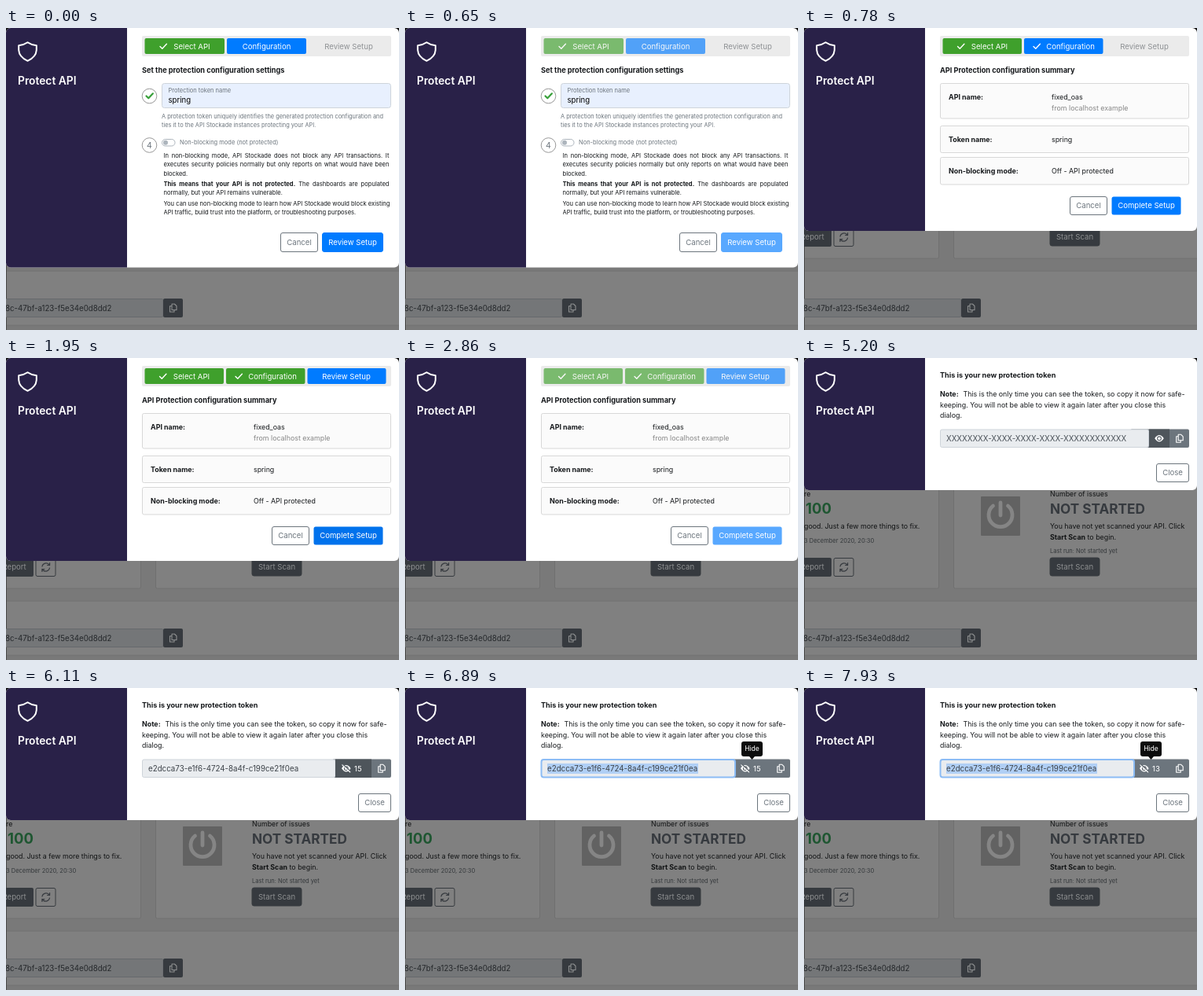
Write an HTML page that moves like this. It is 500x384 px and loops after 8000 ms.

```html
<!DOCTYPE html>
<html lang="en">
<head>
<meta charset="utf-8">
<title>Protect API</title>
<style>
  html, body { margin: 0; width: 100%; height: 100%; overflow: hidden; background: #797979; }
  svg { display: block; width: 500px; height: 384px; }
  svg, .copy { font-family: Inter, Roboto, "Liberation Sans", sans-serif; }
  .copy { font-size: 7.6px; line-height: 11.4px; color: #16191c; white-space: nowrap; }
  .copy p { margin: 0 0 2px; }
  .copy div { height: 11.4px; }
  .copy div:not(:last-child) { text-align-last: justify; }
</style>
</head>
<body>
<svg id="stage" viewBox="0 0 500 384"></svg>
<script>
const INK = '#16191c', GREY = '#6c757d', BLUE = '#007bff', GREEN = '#3fa02c';
const LINE = 'fill="none" stroke-linecap="round" stroke-linejoin="round"';

const text = (x, y, size, str, fill = INK, extra = '') =>
  `<text x="${x}" y="${y}" font-size="${size}" fill="${fill}" ${extra}>${str}</text>`;
const bold = (x, y, size, str, fill = INK) => text(x, y, size, str, fill, 'font-weight="700"');
const mid = (x, y, size, str, fill, extra = '') => text(x, y, size, str, fill, 'text-anchor="middle" ' + extra);
const box = (x, y, w, h, fill, stroke = 'none', r = 2, extra = '') =>
  `<rect x="${x}" y="${y}" width="${w}" height="${h}" rx="${r}" fill="${fill}" stroke="${stroke}" ${extra}/>`;
const line = (d, stroke, width) => `<path d="${d}" ${LINE} stroke="${stroke}" stroke-width="${width}"/>`;
const group = (id, ...parts) => `<g id="${id}">${parts.join('')}</g>`;

const button = (x, y, w, h, label, fill, ink, stroke = fill, extra = '') =>
  box(x + .5, y + .5, w - 1, h - 1, fill, stroke, 2.5, extra) + mid(x + w / 2, y + h / 2 + 3.4, 9.6, label, ink);
const outlined = (x, y, w, h, label) => button(x, y, w, h, label, '#fff', GREY, GREY);
const check = (x, y, color, width = 1.4) => line(`M${x - 4} ${y}l2.8 2.8 5.6-6`, color, width);
const copyIcon = (x, y, color) =>
  line(`M${x - 1.5} ${y - 5}h3.5l2.5 2.5v5h-6zM${x - 2} ${y - 2.5}h-2v7.5h5.5v-2`, color, 1.1);
const eye = (x, y, slashed) =>
  `<path d="M${x - 5.8} ${y}q5.8-8.4 11.6 0q-5.8 8.4-11.6 0z" fill="#fff"/>
   <circle cx="${x}" cy="${y}" r="2.4" fill="#fff" stroke="#596168" stroke-width="1.1"/>` +
  (slashed ? line(`M${x - 4.2} ${y - 5}l10 9.2`, '#596168', 1.6) + line(`M${x - 5} ${y - 4.5}l10 9.2`, '#fff', 1.1) : '');

function backdrop() {
  const dark = '#363a3f', pale = '#8d8f90', ink = '#111314', edge = '#707070';
  return box(0, 0, 500, 384, '#797979', 'none', 0) + box(0, 0, 500, 12, '#111', 'none', 0) +
    box(-10, 100.5, 181.5, 192.5, '#808080', edge) + box(190.5, 100.5, 330, 192.5, '#808080', edge) +
    box(-10, 309, 530, 69, '#808080', edge) + box(0, 12, 1, 372, '#4a4a4a', 'none', 0) +
    text(0, 176.3, 8.85, 're', ink) +
    text(35, 197.5, 18.5, '100', '#1e5631', 'font-weight="700" text-anchor="end"') +
    text(0, 217.3, 8.85, 'good. Just a few more things to fix.', ink) +
    text(0, 235, 7.5, '3 December 2020, 20:30', '#33373a') +
    box(-10, 254, 45, 24, dark) + text(-4.5, 269.3, 9.6, 'Report', pale) +
    box(38, 254.5, 25, 23, 'none', dark) +
    line('M46 265a5 5 0 0 1 8.6-2.5l1 1v-3m0 3h-3M55.500 267a5 5 0 0 1-8.600 2.500l-1-1v3m0-3h3', dark, 1.2) +
    box(225, 176, 50, 50, '#626262', 'none', 1) +
    line('M240.500 188a15 15 0 1 0 19 0M250 184v16', '#858585', 4.8) +
    text(313, 176.3, 8.85, 'Number of issues', ink) +
    text(313, 197.5, 17.2, 'NOT STARTED', '#363a3f', 'font-weight="700"') +
    text(313, 217.3, 8.85, 'You have not yet scanned your API. Click', ink) +
    text(313, 230.8, 8.85, '<tspan font-weight="700">Start Scan</tspan> to begin.', ink) +
    text(313, 248.4, 7.5, 'Last run: Not started yet', '#33373a') +
    button(312.5, 253.5, 64, 24, 'Start Scan', dark, pale) +
    box(-10, 344.5, 210, 23, '#747678', '#66696c') + text(-1, 359.5, 9.7, '8c-47bf-a123-f5e34e0d8dd2', '#25282b') +
    box(200, 344, 25, 24, dark) + copyIcon(212.5, 356, pale);
}

function settings() {
  const para = (...rows) => `<p>${rows.map(r => `<div>${r}</div>`).join('')}</p>`.replace(/(<\/?)p>/g, (m, tag) =>
    tag === '<' ? '<section style="margin-bottom:2px">' : '</section>');
  return box(173, 10, 317, 26, '#ebebeb') +
    group('tabsA',
      box(176.5, 13, 101.5, 20, GREEN), check(200, 23.5, '#fff'), mid(236.5, 27, 9.6, 'Select API', '#fff'),
      box(281, 13, 101, 20, BLUE), mid(331.5, 27, 9.6, 'Configuration', '#fff')) +
    mid(436, 27, 9.6, 'Review Setup', '#8e9194') +
    bold(173, 56.5, 9.2, 'Set the protection configuration settings') +
    '<circle cx="182.500" cy="86.500" r="9.300" fill="#fff" stroke="#999"/>' + check(182.5, 86.5, '#38a03a', 2.2) +
    box(198.5, 70.5, 291, 31, '#e8f0fe', '#ced4da', 3) +
    text(206.5, 81.8, 7.5, 'Protection token name', GREY) + text(206.5, 94.5, 9.6, 'spring', '#000') +
    text(198, 115, 7.4, 'A protection token uniquely identifies the generated protection configuration and', GREY) +
    text(198, 126, 7.4, 'ties it to the API Stockade instances protecting your API.', GREY) +
    '<circle cx="182.500" cy="149" r="9.300" fill="#fff" stroke="#999"/>' + mid(182.5, 152.8, 10.5, '4', GREY) +
    box(198.5, 141.5, 16.5, 8.5, '#fff', '#adb5bd', 4.2) + '<circle cx="203" cy="145.750" r="3" fill="#adb5bd"/>' +
    text(221, 148.3, 7.5, 'Non-blocking mode (not protected)', GREY) +
    `<foreignObject x="200.500" y="156.800" width="287" height="92"><div class="copy" xmlns="http://www.w3.org/1999/xhtml">` +
    para('In non-blocking mode, API Stockade does not block any API transactions. It',
      'executes security policies normally but only reports on what would have been', 'blocked.') +
    para('<b>This means that your API is not protected.</b> The dashboards are populated',
      'normally, but your API remains vulnerable.') +
    para('You can use non-blocking mode to learn how API Stockade would block existing',
      'API traffic, build trust into the platform, or troubleshooting purposes.') +
    '</div></foreignObject>' +
    outlined(349, 260, 48, 25, 'Cancel') + group('review', button(402, 260, 78, 25, 'Review Setup', BLUE, '#fff'));
}

function summary() {
  const row = (y, h, name, value) => box(173.5, y, 316, h, '#fbfbfb', '#d8d8d8') +
    bold(184, y + 20.3, 8.9, name) + text(315, y + 20.3, 8.85, value);
  return box(173, 10, 317, 26, '#ebebeb') +
    group('tabsB',
      box(176.5, 13, 100.5, 20, GREEN), check(199.5, 23.5, '#fff'), mid(236, 27, 9.6, 'Select API', '#fff'),
      box(280, 13, 100.5, 20, BLUE, 'none', 2, 'id="configTab"'), check(296, 23.5, '#fff'),
      mid(339, 27, 9.6, 'Configuration', '#fff'),
      box(383.5, 13, 100, 20, '#ebebeb', 'none', 2, 'id="reviewTab"'),
      mid(433, 27, 9.6, 'Review Setup', '#8e9194', 'id="reviewLabel"')) +
    bold(173, 56.5, 9.2, 'API Protection configuration summary') +
    row(70.5, 44.5, 'API name:', 'fixed_oas') + text(315, 104.6, 8.85, 'from localhost example', '#868686') +
    row(124.5, 34, 'Token name:', 'spring') + row(164.5, 34.5, 'Non-blocking mode:', 'Off - API protected') +
    outlined(338, 214, 48, 24, 'Cancel') +
    group('complete', button(391, 214, 89, 24, 'Complete Setup', BLUE, '#fff', 'none', 'id="completeBox"'));
}

function token() {
  const field = w => box(173.5, 91, w, 22.5, '#e9ecef', '#ced4da');
  return bold(173, 25, 9.1, 'This is your new protection token') +
    bold(173, 48.8, 8.9, 'Note:') +
    text(202.5, 48.8, 8.85, 'This is the only time you can see the token, so copy it now for safe-') +
    text(173, 62.5, 8.85, 'keeping. You will not be able to view it again later after you close this') +
    text(173, 76.3, 8.85, 'dialog.') +
    box(415, 90.5, 75, 23.5, GREY) +
    group('hidden', field(265), text(181, 105.7, 9.8, 'XXXXXXXX-XXXX-XXXX-XXXX-XXXXXXXXXXXX', '#495057')) +
    group('shown', field(245.5)) +
    group('focus', box(173.5, 91, 246.5, 22.5, '#e9ecef', '#8cbcf5', 3, 'stroke-width="2"'),
      box(181, 96, 192, 13, '#b0cff5', 'none', 0)) +
    group('secret', text(181, 105.7, 9.75, 'e2dcca73-e1f6-4724-8a4f-c199ce21f0ea', '#3c4248')) +
    box(439, 90.5, 26, 23.5, '#4e555b', 'none', 0, 'id="hover"') +
    group('open', eye(452, 102.3)) +
    group('shut', eye(432.8, 102.3, true), text(443, 105.7, 9.6, '15', '#fff', 'id="count"')) +
    copyIcon(477.7, 102.3, '#fff') +
    group('tip', box(428, 68, 27, 19, '#0c0c0c', 'none', 3), '<path d="M438 87h7l-3.500 4z" fill="#0c0c0c"/>',
      mid(441.5, 80.4, 8.6, 'Hide', '#fff')) +
    outlined(448, 134, 42, 24, 'Close');
}

const stage = document.getElementById('stage');
stage.innerHTML = `<clipPath id="frame">${box(0, 0, 500, 304, '#fff', 'none', 6, 'id="sheet"')}</clipPath>` +
  backdrop() + '<g clip-path="url(#frame)">' +
  box(0, 0, 500, 305, '#fff', 'none', 0) + box(0, 0, 154, 305, '#292148', 'none', 0) +
  line('M27.500 18.300Q32 21.500 38.800 22.300V28Q38.300 37 27.500 41.800Q16.700 37 16.200 28V22.300Q23 21.500 27.500 18.300z', '#fff', 2) +
  text(15, 72, 13.8, 'Protect API', '#fff', 'font-weight="600"') +
  group('settings', settings()) + group('summary', summary()) + group('token', token()) + '</g>';

const STEP = 130, LOOP = 8000;
const set = (id, name, value) => document.getElementById(id).setAttribute(name, value);
const show = (id, on) => set(id, 'display', on ? 'inline' : 'none');
const fade = (id, value) => set(id, 'opacity', value);
const ramp = (t, a, b) => Math.min(1, Math.max(0, (t - a) / (b - a)));
const mix = (a, b, k) => `rgb(${a.map((v, i) => Math.round(v + (b[i] - v) * k))})`;
const rgb = { blue: [0, 123, 255], deep: [0, 105, 217], green: [63, 160, 44], bar: [235, 235, 235], mute: [142, 145, 148], white: [255, 255, 255] };

function draw(now) {
  const t = Math.floor(now % LOOP / STEP) * STEP;
  const page = t < 780 ? 0 : t < 3770 ? 1 : 2;
  ['settings', 'summary', 'token'].forEach((id, i) => show(id, i === page));
  set('sheet', 'height', [304.5, 258, 168][page]);

  // buttons dim while a request is pending
  const busyA = 1 - .35 * ramp(t, 130, 390), busyB = 1 - .35 * ramp(t, 2600, 2860);
  fade('tabsA', busyA); fade('review', busyA);
  fade('tabsB', busyB); fade('complete', busyB);

  const next = ramp(t, 780, 1040);
  set('configTab', 'fill', mix(rgb.blue, rgb.green, next));
  set('reviewTab', 'fill', mix(rgb.bar, rgb.blue, next));
  set('reviewLabel', 'fill', mix(rgb.mute, rgb.white, next));
  set('completeBox', 'fill', mix(rgb.blue, rgb.deep, ramp(t, 1820, 2080) - ramp(t, 2600, 2860)));

  const revealed = t >= 6110;
  show('hidden', !revealed); show('open', !revealed);
  ['shown', 'secret', 'shut'].forEach(id => show(id, revealed));
  set('hover', 'x', revealed ? 419 : 439);
  set('hover', 'width', revealed ? 46 : 26);
  fade('hover', ramp(t, 4940, 5200) - ramp(t, 6110, 6500));
  fade('open', 1 - .35 * ramp(t, 5330, 5720));
  fade('tip', ramp(t, 6110, 6500));
  fade('focus', ramp(t, 6500, 6890));
  document.getElementById('count').textContent = 15 - Math.max(0, Math.floor((t - 6110) / 910));
}

const start = performance.now();
function tick() {
  draw(performance.now() - start);
  requestAnimationFrame(tick);
}
tick();
</script>
</body>
</html>
```
